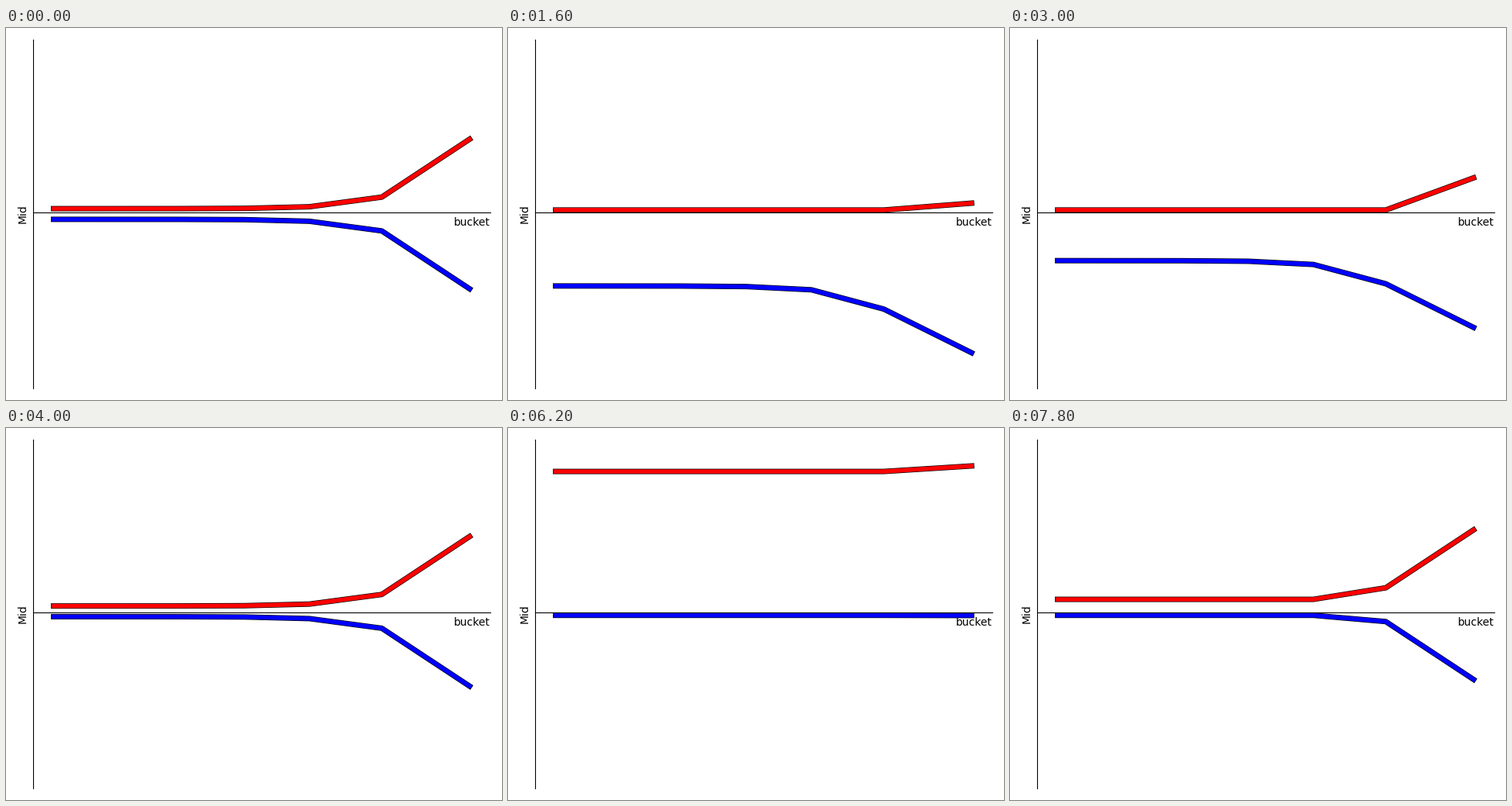
A matplotlib script that plays this animation: 640 px wide and 480 px high, repeating every 8000 ms.

```python
import numpy as np
import matplotlib.pyplot as plt
import matplotlib.patheffects as pe
from matplotlib.animation import FuncAnimation

FRAMES, INTERVAL = 40, 200
TICK = 1         # quotes stay at least one tick from mid
STEP = 3         # skew change per frame, in ticks
LEAN = 0.5       # extra skew while moving away from mid

xs = np.array([0, 0.3, 0.459, 0.615, 0.789, 1])
half = 2 * TICK + 26.07 * 6.0 ** -np.arange(5, -1, -1)

plt.rcParams["font.family"] = "DejaVu Sans"
fig, ax = plt.subplots(figsize=(6.4, 4.8), dpi=100, facecolor="white")
ax.spines[["top", "right"]].set_visible(False)
ax.spines["bottom"].set_position("zero")
ax.set_xticks([])
ax.set_yticks([])
ax.set_xlim(-0.05, 1.05)
ax.set_ylim(-65.95, 64.95)
ax.set_xlabel("bucket", loc="right")
ax.set_ylabel("Mid")
fig.tight_layout()


def band(color):
    outline = [pe.Stroke(linewidth=5, foreground="black"), pe.Normal()]
    line, = ax.plot([], [], color=color, lw=4, path_effects=outline)
    return line


ask_line, bid_line = band("red"), band("blue")


def skew(n):
    """Triangle wave: down and back, then up and back."""
    sign = -1 if n < 20 else 1
    k = n % 20
    return sign * (STEP * k + LEAN if k < 10 else STEP * (20 - k))


def quotes(c):
    """Ask and bid around the skewed centre, never crossing mid."""
    ask, bid = c + half, c - half
    low, high = ask < TICK, bid > -TICK
    bid = np.where(low, np.maximum(bid - half + TICK, 2 * c), bid)
    ask = np.where(high, 2 * c - TICK, ask)
    return np.where(low, TICK, ask), np.where(high, -TICK, bid)


def update(n):
    ask, bid = quotes(skew(n))
    ask_line.set_data(xs, ask)
    bid_line.set_data(xs, bid)
    return ask_line, bid_line


anim = FuncAnimation(fig, update, frames=FRAMES, interval=INTERVAL,
                     repeat=True, repeat_delay=0, blit=False)
plt.show()
```
